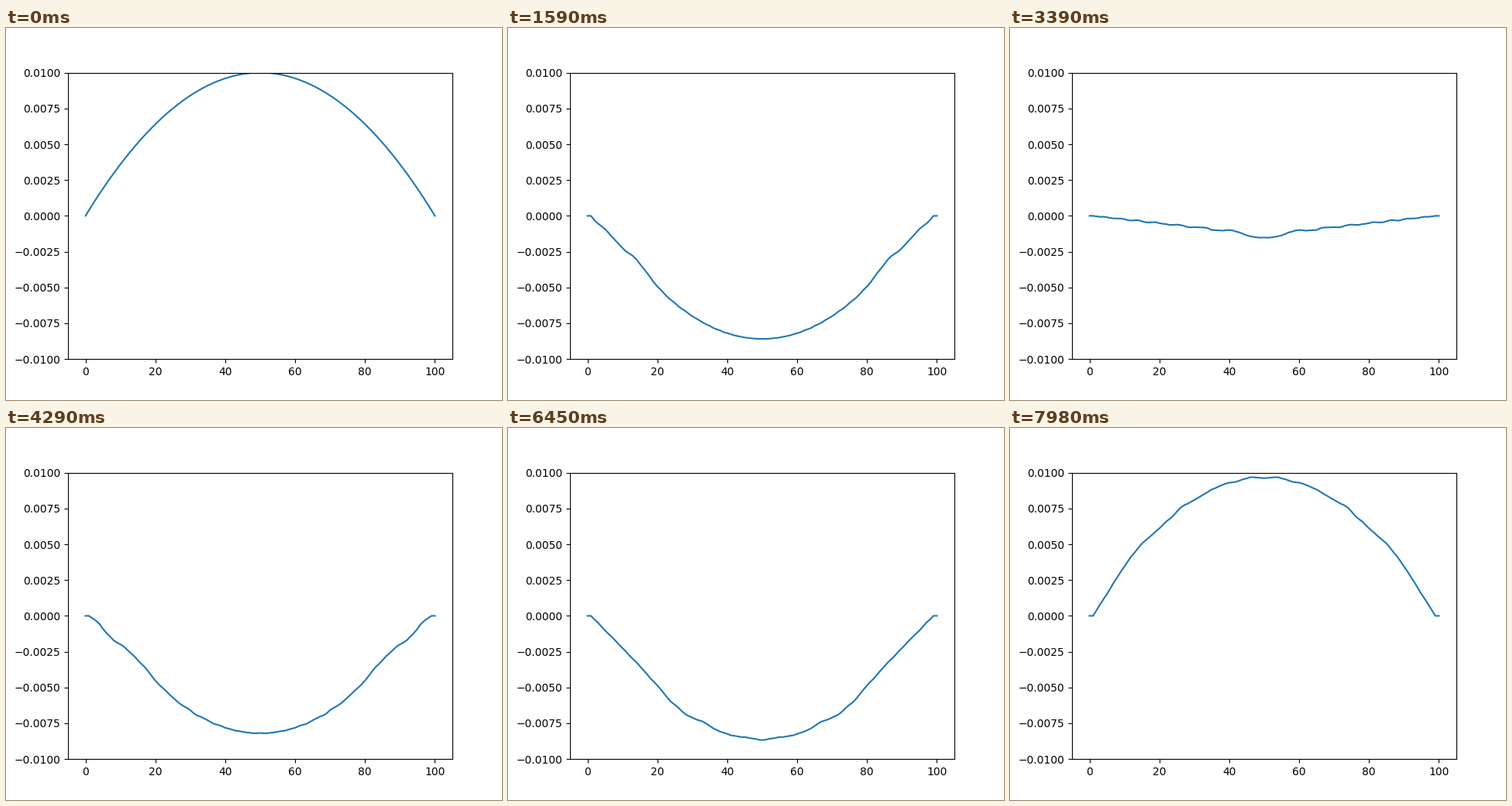
These frames come from a looping animation (640x480 px, 8000 ms). A matplotlib script:

```python
import numpy as np
import matplotlib.pyplot as plt
from matplotlib.animation import FuncAnimation

# Damped string, fixed at both ends, solved with finite differences
POINTS = 101
LENGTH = 0.7
PITCH = 220
GAMMA = 4.7e-5
DT = 5e-6
STEPS_PER_FRAME = 10
FRAMES = 267
LOOP_MS = 8000


def solve(steps):
    dx = LENGTH / (POINTS - 1)
    c = 2 * LENGTH * PITCH
    r2 = (c * DT / dx) ** 2
    g = GAMMA * c ** 2 * DT / 2

    s = np.linspace(0, 1, POINTS)
    y = np.zeros((steps, POINTS))
    y[:2] = 0.04 * s * (1 - s)
    for t in range(1, steps - 1):
        lap = y[t, 1:-3] - 2 * y[t, 2:-2] + y[t, 3:-1]
        y[t + 1, 2:-2] = (r2 * lap + 2 * y[t, 2:-2]
                          - (1 - g) * y[t - 1, 2:-2]) / (1 + g)
    return y


shapes = solve((FRAMES - 1) * STEPS_PER_FRAME + 1)[::STEPS_PER_FRAME]

fig, ax = plt.subplots(figsize=(6.4, 4.8), dpi=100)
line, = ax.plot(shapes[0], color="#1f77b4", lw=1.5)
ax.set_xlim(-5, 105)
ax.set_ylim(-0.01, 0.01)


def update(i):
    line.set_ydata(shapes[i])
    return line,


anim = FuncAnimation(fig, update, frames=FRAMES, interval=LOOP_MS / FRAMES,
                     repeat=True, repeat_delay=0)
plt.show()
```
